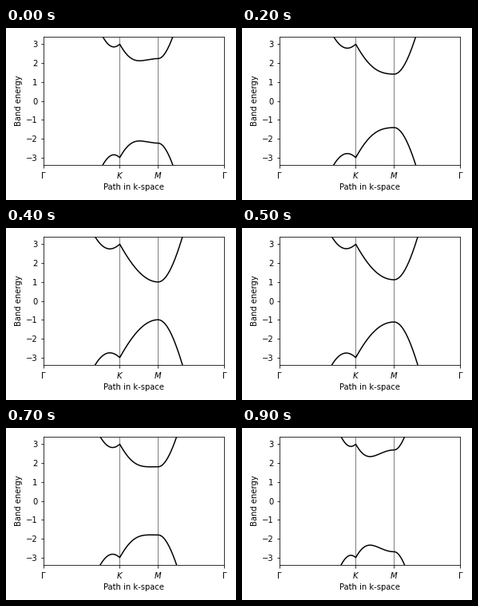
These frames come from a looping animation (288x216 px, 1 s). A matplotlib script:

```python
import numpy as np
import matplotlib.pyplot as plt
from matplotlib.animation import FuncAnimation

FRAMES = 10
INTERVAL = 100
POINTS = 200

# High-symmetry points in reduced coordinates, with path lengths of a hexagonal zone
NODES = 2 * np.pi * np.array([[0, 0], [2 / 3, 1 / 3], [1 / 2, 1 / 2], [0, 0]])
NODE_DIST = np.cumsum([0, 2, 1, np.sqrt(3)])
NODE_LABELS = [r"$\Gamma$", "$K$", "$M$", r"$\Gamma$"]


def sample_path():
    dist = np.unique(np.concatenate(
        [np.linspace(a, b, POINTS) for a, b in zip(NODE_DIST, NODE_DIST[1:])]))
    k1, k2 = (np.interp(dist, NODE_DIST, NODES[:, i]) for i in range(2))
    return dist, k1, k2


def upper_band(hopping, k1, k2):
    """Two-band model: honeycomb hopping plus a momentum-dependent mass."""
    off_diagonal = hopping * (1 + np.exp(-1j * k1) + np.exp(-1j * k2))
    mass = 5 + 2 * np.cos(k1) + 2 * np.cos(k2)
    return np.hypot(np.abs(off_diagonal), mass)


dist, k1, k2 = sample_path()

plt.rcParams.update({"font.family": "DejaVu Sans", "font.size": 10})
fig, ax = plt.subplots(figsize=(4, 3), dpi=72)
upper, = ax.plot([], [], "k-", lw=1.5)
lower, = ax.plot([], [], "k-", lw=1.5)
for node in NODE_DIST[1:-1]:
    ax.axvline(node, color="k", lw=0.5)

ax.set_xlim(NODE_DIST[0], NODE_DIST[-1])
ax.set_ylim(-3.4, 3.4)
ax.set_xticks(NODE_DIST, NODE_LABELS)
ax.set_yticks(range(-3, 4))
ax.set_xlabel("Path in k-space")
ax.set_ylabel("Band energy")
fig.tight_layout()


def update(frame):
    energy = upper_band(-2 + 0.5 * frame, k1, k2)
    upper.set_data(dist, energy)
    lower.set_data(dist, -energy)
    return upper, lower


anim = FuncAnimation(fig, update, frames=FRAMES, interval=INTERVAL,
                     repeat=True, repeat_delay=0)
plt.show()
```
